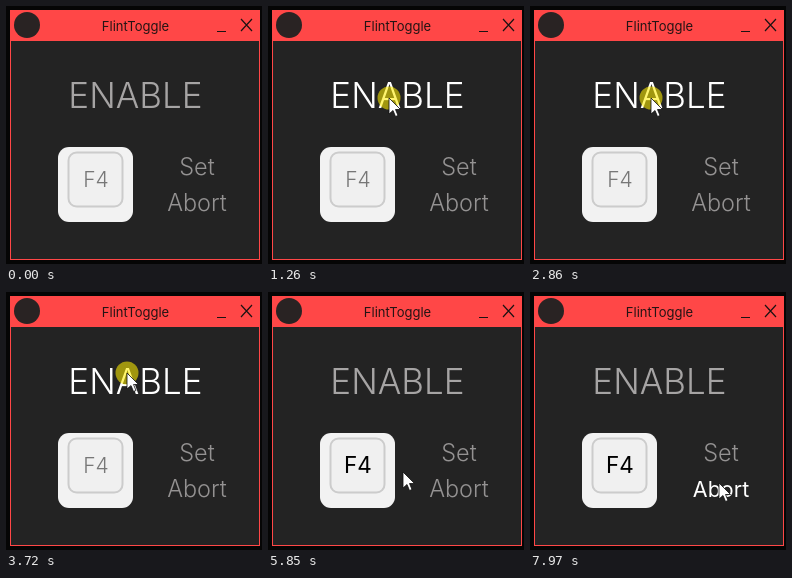
Animation of 256x258 px, one loop 8000 ms. Source, as an HTML page:

```html
<!DOCTYPE html>
<html lang="en">
<head>
<meta charset="utf-8">
<title>FlintToggle</title>
<style>
html, body { margin: 0; width: 100%; height: 100%; overflow: hidden; background: #050505; }
svg { display: block; width: 256px; height: 258px; }
text { font-family: Inter, Roboto, sans-serif; font-weight: 300; text-anchor: middle; fill: #949292; }
.title { font-size: 13px; font-weight: 400; fill: #251414; }
#toggle { font-size: 35px; fill: #a6a4a4; }
.action { font-size: 23.5px; }
#key { font-size: 21px; fill: #777; }
#key.active { font-size: 22.5px; font-weight: 400; fill: #000; }
#toggle.hover, .action.hover { fill: #fff; }
.action.hover { font-size: 21.5px; font-weight: 400; }
</style>
</head>
<body>
<svg viewBox="0 0 256 258">
  <rect x="4.5" y="4.5" width="249" height="249" fill="#232323" id="frame"/>
  <rect x="4" y="4" width="250" height="31" id="bar"/>
  <circle cx="21" cy="19" r="13" fill="#292323"/>
  <text class="title" x="129.5" y="25">FlintToggle</text>
  <path d="M211 25.5h9M235 13l11 12M246 13l-11 12" stroke="#1c1212" stroke-width="1.2" fill="none"/>
  <text id="toggle" x="129.5" y="102"></text>
  <rect x="52" y="141" width="75" height="75" rx="11" fill="#f2f2f2"/>
  <rect x="62.5" y="146.5" width="54" height="54" rx="8" fill="#f0f0f0" stroke="#ccc" stroke-width="2"/>
  <text id="key" x="90" y="181">F4</text>
  <text class="action" id="set" x="191" y="169">Set</text>
  <text class="action" id="abort" x="191" y="205">Abort</text>
  <g id="pointer">
    <circle id="halo" r="11.5" fill="#ffee00" fill-opacity=".57"/>
    <path id="arrow" d="M0 0V16L4 12.5L6.5 18.5L9 17.5L6.5 11.5H11.5Z" fill="#fff" stroke="#111" stroke-width=".8"/>
    <path id="beam" d="M-3-7.5H-1L0-6.5L1-7.5H3M0-6.5V6.5M-3 7.5H-1L0 6.5L1 7.5H3" fill="none" stroke="#333"/>
  </g>
</svg>
<script>
const LOOP = 8000, TRAVEL = 330, PRESS = 130;
const $ = id => document.getElementById(id);

// Places the pointer visits, with the time it arrives
const stops = [
  { at: 0, x: 122, y: 280 },
  { at: 460, x: 121, y: 92 },
  { at: 1930, x: 238, y: 20 },
  { at: 2260, x: 220, y: 26 },
  { at: 2600, x: 121, y: 92 },
  { at: 3320, x: 121, y: 81 },
  { at: 4320, x: 110, y: 174 },
  { at: 5720, x: 135, y: 180 },
  { at: 7230, x: 190, y: 166 },
  { at: 7700, x: 189, y: 191 }
];
// Each click flips the switch; the last one focuses the key field
const clicks = [600, 1260, 1590, 2860, 3460, 3720, 3920, 4590];

function pointerAt(t) {
  let { x, y } = stops[0];
  for (const stop of stops) {
    const p = Math.min(1, Math.max(0, 1 - (stop.at - t) / TRAVEL));
    const ease = p * p * (3 - 2 * p);
    x += (stop.x - x) * ease;
    y += (stop.y - y) * ease;
  }
  return { x, y };
}

const show = (id, on) => $(id).setAttribute('visibility', on ? 'visible' : 'hidden');

function draw(t) {
  const { x, y } = pointerAt(t);
  const over = (cx, cy, w, h) => Math.abs(x - cx) < w / 2 && Math.abs(y - cy) < h / 2;
  const on = clicks.filter(time => time <= t).length % 2 === 1;
  const color = on ? '#4dff80' : '#ff4747';
  const overKey = over(90, 174, 56, 56);

  $('frame').setAttribute('stroke', color);
  $('bar').setAttribute('fill', color);
  $('toggle').textContent = on ? 'DISABLE' : 'ENABLE';
  $('toggle').classList.toggle('hover', over(129, 89, 144, 40));
  $('set').classList.toggle('hover', over(191, 161, 46, 26));
  $('abort').classList.toggle('hover', over(191, 197, 64, 26));
  $('key').classList.toggle('active', t >= clicks.at(-1));

  $('pointer').setAttribute('transform', `translate(${x} ${y})`);
  show('halo', clicks.some(time => t >= time && t < time + PRESS));
  show('arrow', !overKey);
  show('beam', overKey);
}

function tick() {
  draw(performance.now() % LOOP);
  requestAnimationFrame(tick);
}
tick();
</script>
</body>
</html>
```
